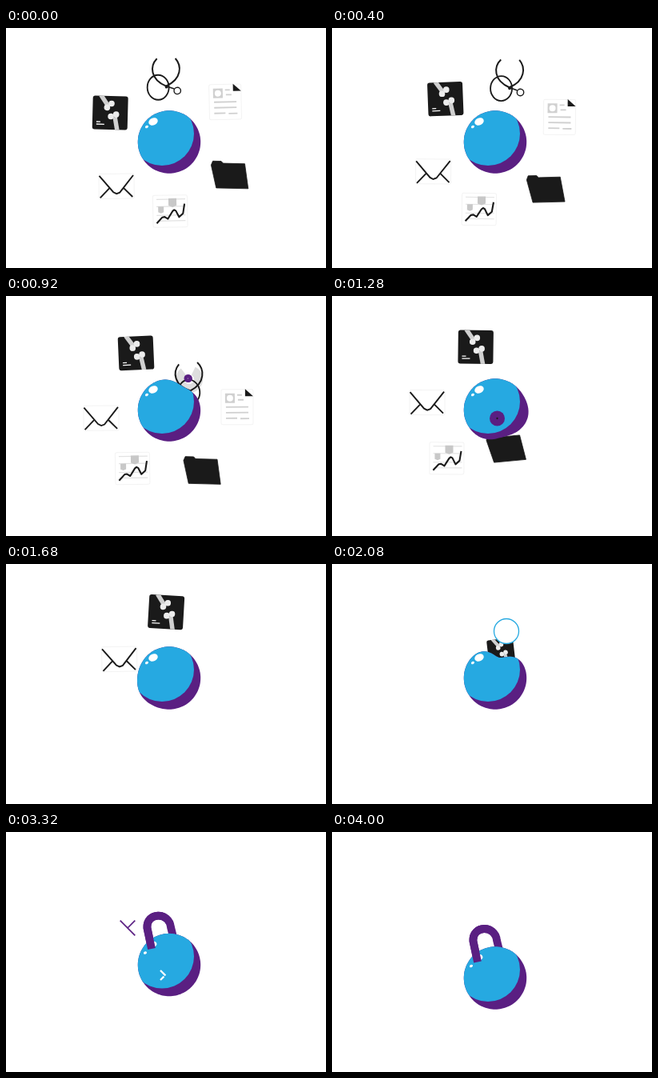
Animation of 400 by 300 pixels, one loop 5000 ms. Source, as an HTML page with a canvas:

```html
<!DOCTYPE html>
<html lang="en">
<head>
<meta charset="utf-8">
<title>Files to lock</title>
<style>
html, body { margin: 0; width: 100%; height: 100%; overflow: hidden; background: #fff; }
canvas { display: block; width: 400px; height: 300px; }
</style>
</head>
<body>
<canvas id="stage" width="400" height="300"></canvas>
<script>
const ctx = document.getElementById('stage').getContext('2d');
const LOOP = 5000, STEP = 40;
const BLUE = '#26a9e1', PURPLE = '#5a1f82', BLACK = '#1a1a1a', GREY = '#d0d0d0', PALE = '#f3f3f3';
const HUB = { x: 204.5, y: 143 }, SPIN = 36;
const BALL = { x: 204, y: 142.5, r: 39.2 };
const PULL = 385;
const TAU = Math.PI * 2, RAD = Math.PI / 180;

const clamp = v => Math.max(0, Math.min(1, v));
const ramp = (t, a, b) => clamp((t - a) / (b - a));
const smooth = u => u * u * (3 - 2 * u);
const mix = (a, b, u) => a + (b - a) * u;

function trace(points, close) {
  ctx.beginPath();
  points.forEach(([x, y], i) => i ? ctx.lineTo(x, y) : ctx.moveTo(x, y));
  if (close) ctx.closePath();
}

function fill(color) { ctx.fillStyle = color; ctx.fill(); }

function stroke(color, width) {
  ctx.strokeStyle = color;
  ctx.lineWidth = width;
  ctx.stroke();
}

function line(points, color, width) { trace(points); stroke(color, width); }

function disc(x, y, r, color) {
  ctx.beginPath();
  ctx.arc(x, y, r, 0, TAU);
  fill(color);
}

function oval(x, y, rx, ry, turn, color) {
  ctx.beginPath();
  ctx.ellipse(x, y, rx, ry, turn, 0, TAU);
  fill(color);
}

function paper(w, h) {
  ctx.beginPath();
  ctx.roundRect(-w / 2, -h / 2, w, h, 2);
  fill('#fff');
  stroke(PALE, 1);
}

function stethoscope(pulled) {
  // the parts slide together while it is pulled in
  const fold = ramp(pulled, 0, 0.44);
  if (pulled > 0.2) {
    ctx.beginPath();
    ctx.arc(0, 3, 11.5, -58 * RAD, 238 * RAD);
    stroke('#dedede', 11);
  }
  // ear tubes
  ctx.beginPath();
  ctx.moveTo(-11, -17);
  ctx.bezierCurveTo(-20, -8, -20, 9, 0, 17.5);
  ctx.bezierCurveTo(20, 9, 20, -8, 12, -17);
  stroke(BLACK, 2);
  // hose
  ctx.beginPath();
  ctx.ellipse(mix(-10, -2, fold), 19, 13.5, 15.5, 0, 0, TAU);
  stroke(BLACK, 1.8);
  // chest piece
  const x = mix(14, -1, fold), y = mix(23.5, 2, fold);
  if (fold < 0.5) {
    line([[0, 17.5], [4, 19], [x - 4, y - 2.5]], BLACK, 1.6);
    disc(0.5, 18.5, 2, BLACK);
  }
  disc(x, y, 4.2, fold < 0.5 ? '#fff' : PURPLE);
  stroke(fold < 0.5 ? BLACK : PURPLE, 1.4);
}

function documentPage() {
  paper(40, 44);
  trace([[10, -22.5], [20, -13.5], [10, -13.5]], true);
  fill(BLACK);
  ctx.fillStyle = GREY;
  ctx.fillRect(-15, -17, 12, 12);
  disc(-9, -11, 4, '#fff');
  [[0, 6, -15], [1, 8, -9], [-14, 14, 0], [-14, 14, 7], [-14, 0, 14], [4, 15, 14.5]]
    .forEach(([a, b, y]) => line([[a, y], [b, y]], GREY, 1.8));
}

function folder() {
  trace([[-21.5, -17], [-11, -17], [-8.5, -14.5], [18.5, -14.5], [23.5, 16.5],
    [-16.5, 16.5], [-23.5, -12]], true);
  fill(BLACK);
  ctx.lineJoin = 'round';
  stroke(BLACK, 0.8);
}

function chart() {
  paper(43, 40);
  [-15, -6, 5, 12].forEach(y => line([[-17, y], [19, y]], '#e2e2e2', 1.2));
  trace([[-2, -16], [8, -16], [8, -7], [3, -5], [-2, -7]], true);
  fill('#c8c8c8');
  trace([[-15, -6], [-8, -6], [-8, 1], [-11.5, 2.5], [-15, 1]], true);
  fill('#c8c8c8');
  ctx.lineJoin = 'round';
  line([[-17, 15], [-10, 7.5], [-7, 7], [-3, 9.5], [3, 0], [5, -1.5], [7, -0.5], [11, 7.5],
    [16, 3], [18, -9]], BLACK, 2.1);
}

function envelope() {
  paper(44, 31);
  line([[-21.5, -13], [-4, 7.5], [0, 9.5], [4, 8], [21, -13.5]], BLACK, 1.9);
  line([[-20.5, 14.5], [-9, 2.5]], BLACK, 1.9);
  line([[20, 13.5], [9, 2.5]], BLACK, 1.9);
}

function xray() {
  ctx.beginPath();
  ctx.roundRect(-22, -21, 44, 42, 3);
  fill(BLACK);
  ctx.save();
  ctx.clip();
  line([[-12, -22], [-3, -9]], GREY, 5.5);
  line([[9.5, 23], [6, 5]], GREY, 5.5);
  [[-4, -6.5], [1.5, -11.5], [1, 4.5], [7.5, 2]].forEach(([x, y]) => disc(x, y, 3.8, '#ececec'));
  ctx.restore();
  line([[-17, 11.5], [-12, 11.5]], '#fff', 1.3);
  line([[-17, 14.5], [-7, 14.5]], '#fff', 1.3);
}

// angle at the start, distance, time of the pull, wobble: size, period, peak time
const items = [
  { draw: stethoscope, angle: -93, orbit: 88, leave: 662, sway: [1, 1000, 400] },
  { draw: documentPage, angle: -36, orbit: 86, leave: 870, sway: [-1.2, 1200, 0] },
  { draw: folder, angle: 28.5, orbit: 85.5, leave: 1028, sway: [1.5, 1000, 920] },
  { draw: chart, angle: 89.5, orbit: 86, leave: 1250, sway: [-1, 1000, 0] },
  { draw: envelope, angle: 140.5, orbit: 86, leave: 1500, sway: [-0.5, 1000, 0] },
  { draw: xray, angle: 206.5, orbit: 83, leave: 1785, sway: [-3.3, 2100, 680] }
];

function drawItem(item, t) {
  const u = ramp(t, item.leave, item.leave + PULL);
  if (u >= 1) return;
  const pulled = u * u;
  const a = (item.angle + SPIN * t / 1000) * RAD;
  const dist = item.orbit * (1 - pulled);
  const size = 1 - ramp(pulled, 0.45, 1);
  const [sway, period, peak] = item.sway;
  ctx.save();
  ctx.translate(HUB.x + dist * Math.cos(a), HUB.y + dist * Math.sin(a));
  ctx.rotate(sway * RAD * Math.cos(TAU * (t - peak) / period) - 0.42 * pulled * pulled);
  ctx.scale(size, size);
  item.draw(pulled);
  ctx.restore();
}

// each arriving item presses a hollow into the ball, which springs back
function hollows(t) {
  return items.map(item => {
    const u = (t - item.leave) / PULL;
    const back = ramp(u, 0.8, 1.39);
    const spring = Math.cos(1.8 * Math.PI * back) * Math.pow(1 - back, 2.5);
    const depth = 14 * Math.pow(ramp(u, 0.55, 0.775), 1.6) * spring;
    return { depth, angle: (item.angle + SPIN * t / 1000) * RAD };
  });
}

function ballPath(dents) {
  const points = [];
  for (let i = 0; i < 120; i++) {
    const a = i / 120 * TAU;
    let r = BALL.r;
    for (const d of dents) {
      const off = Math.atan2(Math.sin(a - d.angle), Math.cos(a - d.angle));
      r -= d.depth * Math.exp(-off * off / 0.245);
    }
    points.push([r * Math.cos(a), r * Math.sin(a)]);
  }
  trace(points, true);
}

function drawBall(t, dents) {
  const locked = smooth(ramp(t, 2600, 2840));
  ctx.save();
  ballPath(dents);
  fill(PURPLE);
  ctx.clip();
  disc(-9, -10.5, 40, BLUE);
  oval(-20, -25.5, mix(6, 4.5, locked), mix(4.5, 3.5, locked), -0.45, '#fff');
  oval(mix(-28, -30, locked), mix(-19, -15, locked), 2.1, 1.6, -0.45, '#fff');
  ctx.restore();
}

function shackle(part) {
  if (part <= 0) return;
  ctx.save();
  ctx.beginPath();
  ctx.moveTo(-22, -20);
  ctx.lineTo(-27.5, -46);
  ctx.bezierCurveTo(-29, -66, 0, -67, 2, -47);
  ctx.lineTo(6.5, -29);
  ctx.setLineDash([91 * part, 300]);
  stroke(PURPLE, 9.8);
  ctx.restore();
}

function lock(t, dents) {
  const drop = 40 * smooth(ramp(t, 2910, 3643));
  const hop = 6 * Math.sin(Math.PI * ramp(t, 3660, 4000));
  const part = smooth(ramp(t, 2600, 2920));
  ctx.save();
  ctx.translate(BALL.x, BALL.y + drop - hop);
  // the right leg goes behind the ball, the left one in front
  shackle(part);
  drawBall(t, dents);
  ctx.beginPath();
  ctx.rect(-45, -80, 41, 75);
  ctx.clip();
  shackle(part);
  ctx.restore();
}

// one stroke of a cross, drawn on and later wiped off from its start
function dash(t, x1, y1, x2, y2, on, off, color, width) {
  const head = ramp(t, on, on + 150), tail = ramp(t, off, off + 150);
  if (head <= tail) return;
  line([[mix(x1, x2, tail), mix(y1, y2, tail)], [mix(x1, x2, head), mix(y1, y2, head)]],
    color, width);
}

function cross(t, x, y, r, start, lag, fromLeft, color, width) {
  const side = fromLeft ? -r : r;
  dash(t, x - r, y - r, x + r, y + r, start, start + 360, color, width);
  dash(t, x + side, y - side, x - side, y + side, start + lag, start + 360 + lag, color, width);
}

function chestDot(t) {
  if (t < 920 || t > 1480) return;
  const go = ramp(t, 920, 1280);
  const x = mix(227.3, 206.5, go), y = mix(103, 153, go);
  const r = mix(4.8, 9.5, go) * (1 - ramp(t, 1320, 1480));
  disc(x, y, r, PURPLE);
  disc(x, y, r * 0.12, go < 0.5 ? GREY : BLACK);
}

function bubble(t) {
  if (t < 2000 || t > 2160) return;
  disc(218, 84, mix(9, 22, ramp(t, 2000, 2160)), '#fff');
  stroke(BLUE, 1.3);
}

function render(t) {
  ctx.fillStyle = '#fff';
  ctx.fillRect(0, 0, 400, 300);
  const dents = hollows(t);
  items.forEach(item => drawItem(item, t));
  bubble(t);
  lock(t, dents);
  chestDot(t);
  cross(t, 152, 120, 9.3, 3070, 175, false, PURPLE, 1.7);
  cross(t, 199, 179, 6, 3240, 25, true, '#fff', 2.2);
  cross(t, 241, 122, 6.5, 3330, 60, true, PURPLE, 1.7);
}

function tick() {
  render(Math.floor(performance.now() % LOOP / STEP) * STEP);
  requestAnimationFrame(tick);
}
tick();
</script>
</body>
</html>
```
